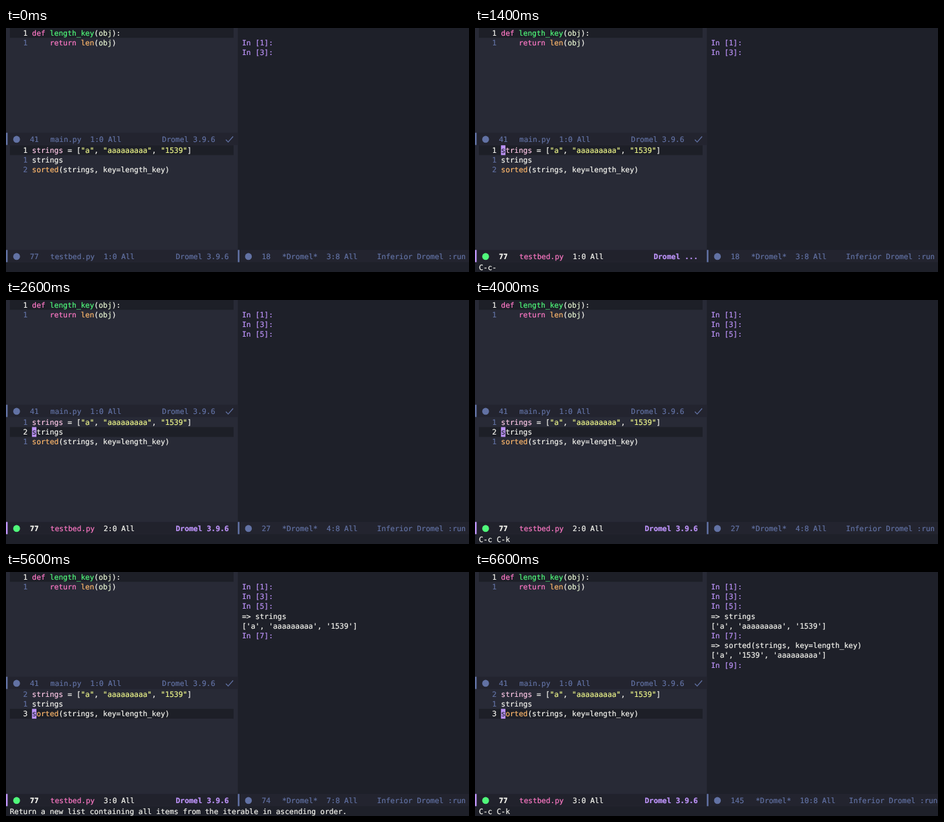
An HTML page for the animation above (8000 ms loop, 716 px wide and 379 px high).

```html
<!DOCTYPE html>
<html lang="en">
<head>
<meta charset="utf-8">
<title>Editor session</title>
<style>
  html, body { margin: 0; width: 100%; height: 100%; overflow: hidden; background: #1e2029; }
  svg { display: block; width: 100%; height: 100%; }
  text {
    font: 11.4px "DejaVu Sans Mono", "Noto Sans Mono", monospace;
    white-space: pre;
    text-rendering: geometricPrecision;
    font-variant-ligatures: none;
  }
  text, tspan { fill: currentColor; stroke: currentColor; stroke-width: .2px; }
</style>
</head>
<body>
<svg id="stage" viewBox="0 0 716 379"></svg>
<script>
const LOOP = 8000, CELL = 6.863, ROW = 15.2, BASE = 11.8, SPLIT = 358.5;
const LANG = "Dromel";
const C = {
  left: "#282a36", right: "#1e2029", bar: "#23242f", activeBar: "#21222c", line: "#1d1f27",
  fg: "#f8f8f2", dim: "#6272a4", pink: "#ff79c6", rose: "#ffc9e8", green: "#50fa7b",
  lime: "#eaf8d4", orange: "#ffb86c", yellow: "#f1fa8c", purple: "#bd93f9"
};

// Each step keeps the values of the one before it unless it changes them.
const STEPS = [
  { t: 0, active: false, line: 0, version: "3.9.6", echo: "", shown: 2, size: "18", pos: "3:8" },
  { t: 400, active: true, version: "..." },
  { t: 1400, echo: "C-c-" },
  { t: 1800, echo: "C-c C-k", version: "3.9.6" },
  { t: 1900, shown: 3, size: "27", pos: "4:8" },
  { t: 2600, line: 1, echo: "" },
  { t: 3400, echo: "C-c-" },
  { t: 4000, echo: "C-c C-k" },
  { t: 4100, shown: 4 },
  { t: 4200, shown: 6, size: "74", pos: "7:8" },
  { t: 5000, line: 2, echo: "" },
  { t: 5600, echo: "Return a new list containing all items from the iterable in ascending order." },
  { t: 5700, echo: "" },
  { t: 5800, echo: "C-c-" },
  { t: 6400, echo: "C-c C-k" },
  { t: 6500, shown: 7 },
  { t: 6600, shown: 9, size: "145", pos: "10:8" }
];
const states = [];
STEPS.forEach((step, i) => states.push({ ...states[i - 1], ...step }));

const mainCode = [
  [["def ", C.pink], ["length_key", C.green], ["(", C.fg], ["obj", C.lime], ["):", C.fg]],
  [["    return ", C.pink], ["len", C.orange], ["(", C.fg], ["obj", C.lime], [")", C.fg]]
];
const testCode = [
  [["strings", C.rose], [" = [", C.fg], ['"a"', C.yellow], [", ", C.fg],
   ['"aaaaaaaaa"', C.yellow], [", ", C.fg], ['"1539"', C.yellow], ["]", C.fg]],
  [["strings", C.fg]],
  [["sorted", C.orange], ["(strings, key=length_key)", C.fg]]
];
const shell = [
  "In [1]:", "In [3]:", "In [5]:",
  "=> strings", "['a', 'aaaaaaaaa', '1539']", "In [7]:",
  "=> sorted(strings, key=length_key)", "['a', '1539', 'aaaaaaaaa']", "In [9]:"
];

const esc = s => s.replace(/&/g, "&amp;").replace(/</g, "&lt;").replace(/>/g, "&gt;");
const rect = (x, y, w, h, fill) =>
  `<rect x="${x}" y="${y}" width="${w}" height="${h}" fill="${fill}"/>`;
const spans = (x, y, parts) =>
  `<text x="${x}" y="${y}">` +
  parts.map(([s, color]) => `<tspan color="${color}">${esc(s)}</tspan>`).join("") + "</text>";
const text = (x, y, s, color, weight = 400) =>
  `<text x="${x}" y="${y}" color="${color}" style="font-weight:${weight}">${esc(s)}</text>`;

function buffer(top, code, current, cursor) {
  return code.map((parts, i) => {
    const y = top + i * ROW, here = i === current;
    const number = here ? i + 1 : Math.abs(i - current);
    let out = here ? rect(6, y, 346, ROW, C.line) : "";
    out += text(26.5, y + BASE, String(number), here ? C.fg : C.dim);
    out += spans(40.3, y + BASE, parts);
    if (here && cursor) {
      out += rect(40.2, y, CELL, ROW, C.purple);
      out += text(40.3, y + BASE, parts[0][0][0], C.left);
    }
    return out;
  }).join("");
}

function modeline(x, y, w, size, name, pos, mode, modeX, active) {
  const base = y + 14, sizeX = x + 37;
  const nameX = sizeX + (size.length + 2.6) * CELL;
  const posX = nameX + (name.length + 2) * CELL;
  const tint = c => active ? c : C.dim;
  const weight = active ? 700 : 400;
  return rect(x, y, w, 19, active ? C.activeBar : C.bar) +
    rect(x, y, 2.5, 19, tint(C.purple)) +
    `<circle cx="${x + 16.4}" cy="${y + 10.2}" r="5.3" fill="${tint(C.green)}"/>` +
    text(sizeX, base, size, tint(C.fg), weight) +
    text(nameX, base, name, tint(C.pink)) +
    text(posX, base, pos + " All", tint(C.fg)) +
    text(modeX, base, mode, tint(C.purple), weight);
}

function draw(s) {
  const mode = `${LANG} ${s.version}`;
  const output = shell.slice(0, s.shown).map((row, i) =>
    text(365, (i + 1) * ROW + BASE, row, row.startsWith("In") ? C.purple : C.fg));
  return rect(0, 0, 716, 379, C.right) +
    rect(0, 0, SPLIT, 364, C.left) +
    buffer(0, mainCode, 0, false) +
    modeline(0, 162.7, SPLIT, "41", "main.py", "1:0", `${LANG} 3.9.6`, 241.3, false) +
    `<path d="M340 173.5l3.6 3.6 7.6-8.6" fill="none" stroke="${C.dim}" stroke-width="1.3"/>` +
    buffer(182.2, testCode, s.line, s.active) +
    modeline(0, 344.7, SPLIT, "77", "testbed.py", `${s.line + 1}:0`, mode,
      344.8 - mode.length * CELL, s.active) +
    output.join("") +
    modeline(SPLIT, 344.7, 716 - SPLIT, s.size, `*${LANG}*`, s.pos, `Inferior ${LANG} :run`,
      s.pos.length > 3 ? 578.3 : 573.8, false) +
    text(6, 375.6, s.echo, C.fg);
}

const stage = document.getElementById("stage");
const start = performance.now();
let last = null;

function tick() {
  const t = (performance.now() - start) % LOOP;
  const state = states.filter(s => s.t <= t).pop();
  if (state !== last) {
    stage.innerHTML = draw(state);
    last = state;
  }
  requestAnimationFrame(tick);
}
tick();
</script>
</body>
</html>
```
